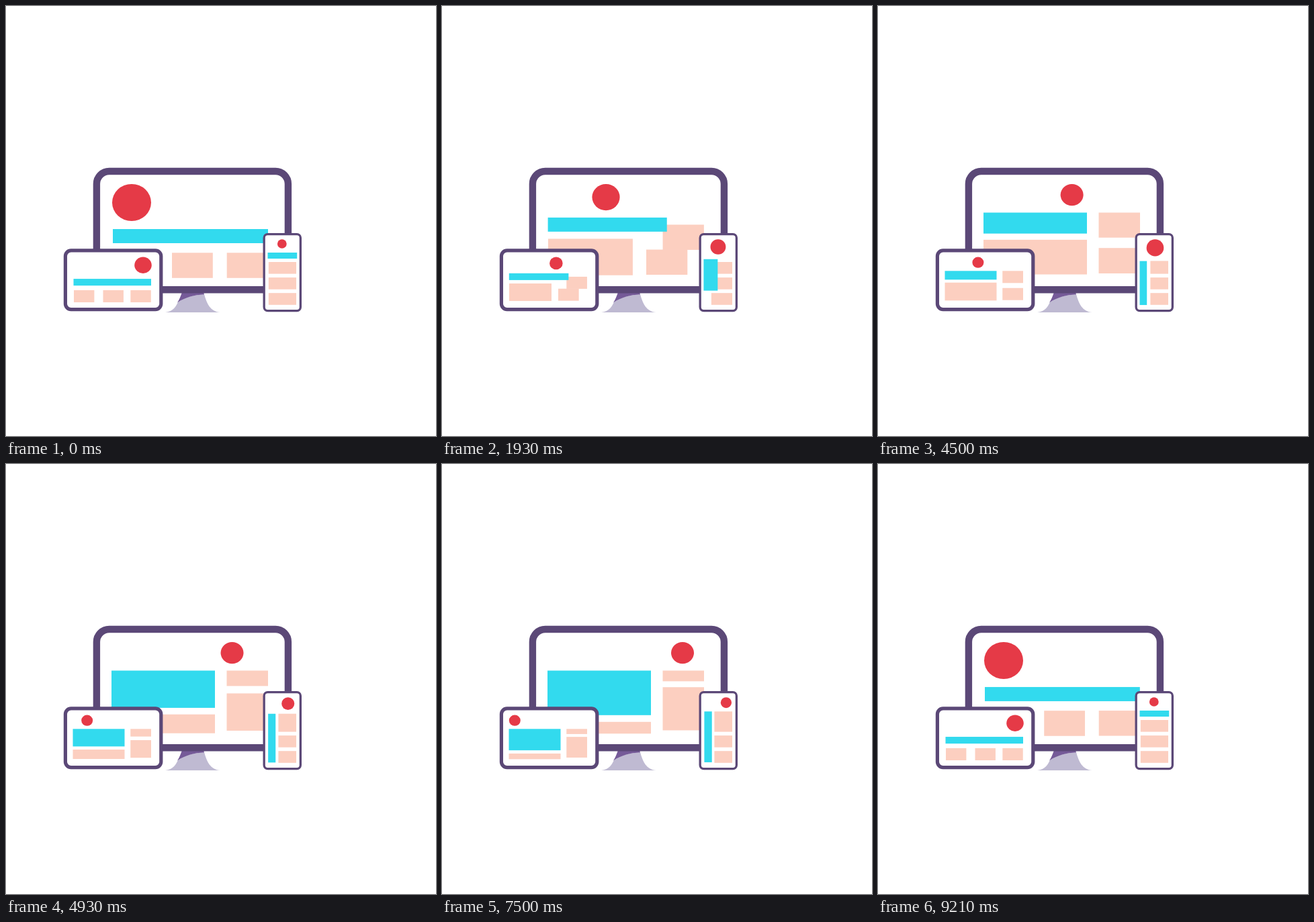
These frames come from a looping animation (640 by 640 pixels, 9.43 s). An HTML page with a canvas:

```html
<!DOCTYPE html>
<html lang="en">
<head>
<meta charset="utf-8">
<title>Responsive layouts</title>
<style>
html, body { margin: 0; width: 100%; height: 100%; overflow: hidden; background: #fff; }
canvas { display: block; width: 640px; height: 640px; }
</style>
</head>
<body>
<canvas id="stage"></canvas>
<script>
const LOOP = 9430, FPS = 14, SIDE_LAG = 120;
const FRAME = '#5b4877', RED = '#e53a47', CYAN = '#32daee', PALE = '#fccfc0';

const canvas = document.getElementById('stage');
const ctx = canvas.getContext('2d');
const ratio = window.devicePixelRatio || 1;
canvas.width = canvas.height = 640 * ratio;
ctx.scale(ratio, ratio);

// Blocks are [left, top, right, bottom], one pose per layout: row, two columns, wide banner.
const column = (x1, x2, cut, gap, end) => [[x1, 307.5, x2, cut], [x1, cut + gap, x2, end]];

function wideLayout(fit) {
  const cards = [160, 247, 328.7].map(x => [x, 367.3, x + 60.8, 404.8]);
  const layouts = [[328.5, 9, 399, 345, 15.5, 398], [373.8, 10, 401.3, 323.4, 8.8, 396.4]].map(
    ([cut, gap, end, sideCut, sideGap, sideEnd]) => [
      ...column(157, 311, cut, gap, end),
      ...column(328.5, 390, sideCut, sideGap, sideEnd)
    ]);
  const part = (first, i, kind, color = PALE) =>
    ({ kind, color, poses: [first, layouts[0][i], layouts[1][i]].map(fit) });
  return [
    part(cards[0], 1, 'main'),
    part(cards[1], 3, 'side'),
    part(cards[2], 2, 'side'),
    part([159, 332, 390, 353], 0, 'main', CYAN)
  ];
}

function narrowLayout() {
  const parts = [0, 1, 2].map(i => {
    const top = 381 + 23.1 * i;
    const card = (x, y) => [x, y, 432, top + 17.6];
    return { color: PALE, poses: [card(390.8, top), card(405.4, top), card(405.4, i ? top : 368.3)] };
  });
  const bar = [[389.5, 367, 433.2, 376], [389.4, 381.2, 400, 445.2], [390.4, 368.3, 401.7, 444]];
  return [...parts, { color: CYAN, poses: bar }];
}

// The tablet page is the desktop page at about half size.
const halve = ([x1, y1, x2, y2]) =>
  [x1 * 0.5 + 21, y1 * 0.48 + 246.7, x2 * 0.5 + 21, y2 * 0.48 + 246.7];

const dotPoses = (xs, radii, top, squash) =>
  xs.map((x, i) => [x, top + radii[i] * squash, radii[i], radii[i] * squash]);

const devices = [
  {
    frame: [129.7, 240.8, 425.1, 427.4, 24, 10.4],
    parts: wideLayout(b => b),
    dot: dotPoses([187, 268.5, 358], [29, 17, 17], 265, 0.95),
    starts: [1426, 4338, 7669], times: [1700, 1700, 1700], dotLead: 130
  },
  {
    frame: [85.8, 361.3, 233.4, 454.2, 11, 5.2],
    parts: wideLayout(halve),
    dot: dotPoses([204, 155.2, 108.3], [12.8, 8.5, 8.5], 373.6, 0.95),
    starts: [1426, 4375, 7566], times: [1700, 1700, 1700], dotLead: 30
  },
  {
    frame: [382.5, 338, 440, 455.3, 7, 3.3],
    parts: narrowLayout(),
    dot: dotPoses([410.8, 411, 422.9], [6.9, 13.5, 8.1], 347.3, 0.98),
    starts: [1440, 4380, 7490], times: [1700, 1700, 1340], dotLead: 0
  }
];

// Cubic bezier easing (0.15, 0, 0, 1), solved by bisection.
function ease(x) {
  if (x <= 0) return 0;
  if (x >= 1) return 1;
  let lo = 0, hi = 1;
  for (let i = 0; i < 30; i++) {
    const s = (lo + hi) / 2;
    if (0.45 * (1 - s) * (1 - s) * s + s * s * s < x) lo = s; else hi = s;
  }
  return lo * lo * (3 - 2 * lo);
}

function pose(poses, device, kind, t) {
  const shift = [0, kind === 'side' ? SIDE_LAG : 0, kind === 'dot' ? -device.dotLead : 0];
  let now = poses[0];
  device.starts.forEach((start, i) => {
    const k = ease((t - start - shift[i]) / device.times[i]);
    if (k === 0) return;
    const next = poses[(i + 1) % 3];
    now = poses[i].map((v, j) => v + (next[j] - v) * k);
  });
  return now;
}

function drawFrame([x1, y1, x2, y2, r, line]) {
  const half = line / 2;
  ctx.beginPath();
  ctx.roundRect(x1 + half, y1 + half, x2 - x1 - line, y2 - y1 - line, r - half);
  ctx.fillStyle = '#fff';
  ctx.fill();
  ctx.lineWidth = line;
  ctx.strokeStyle = FRAME;
  ctx.stroke();
}

function drawDevice(device, t) {
  drawFrame(device.frame);
  for (const { kind, color, poses } of device.parts) {
    const [x1, y1, x2, y2] = pose(poses, device, kind, t);
    ctx.fillStyle = color;
    ctx.fillRect(x1, y1, x2 - x1, y2 - y1);
  }
  ctx.beginPath();
  ctx.ellipse(...pose(device.dot, device, 'dot', t), 0, 0, Math.PI * 2);
  ctx.fillStyle = RED;
  ctx.fill();
}

const foot = new Path2D('M237 456C249 455 253 447 256 440.5C267 433 281 430 295 429C299 443 304 455 319 456Z');
const neck = new Path2D('M262 426H294L295 429.2C281 430 267 433 255 441.5C258 437 260 432 262 426Z');

function drawStand() {
  ctx.fillStyle = '#bfbad2';
  ctx.fill(foot);
  ctx.fillStyle = '#755a98';
  ctx.fill(neck);
}

function draw() {
  const clock = performance.now() % LOOP;
  const t = Math.floor((clock + 4) * FPS / 1000) * 1000 / FPS;
  ctx.fillStyle = '#fff';
  ctx.fillRect(0, 0, 640, 640);
  drawStand();
  for (const device of devices) drawDevice(device, t);
  requestAnimationFrame(draw);
}
draw();
</script>
</body>
</html>
```
